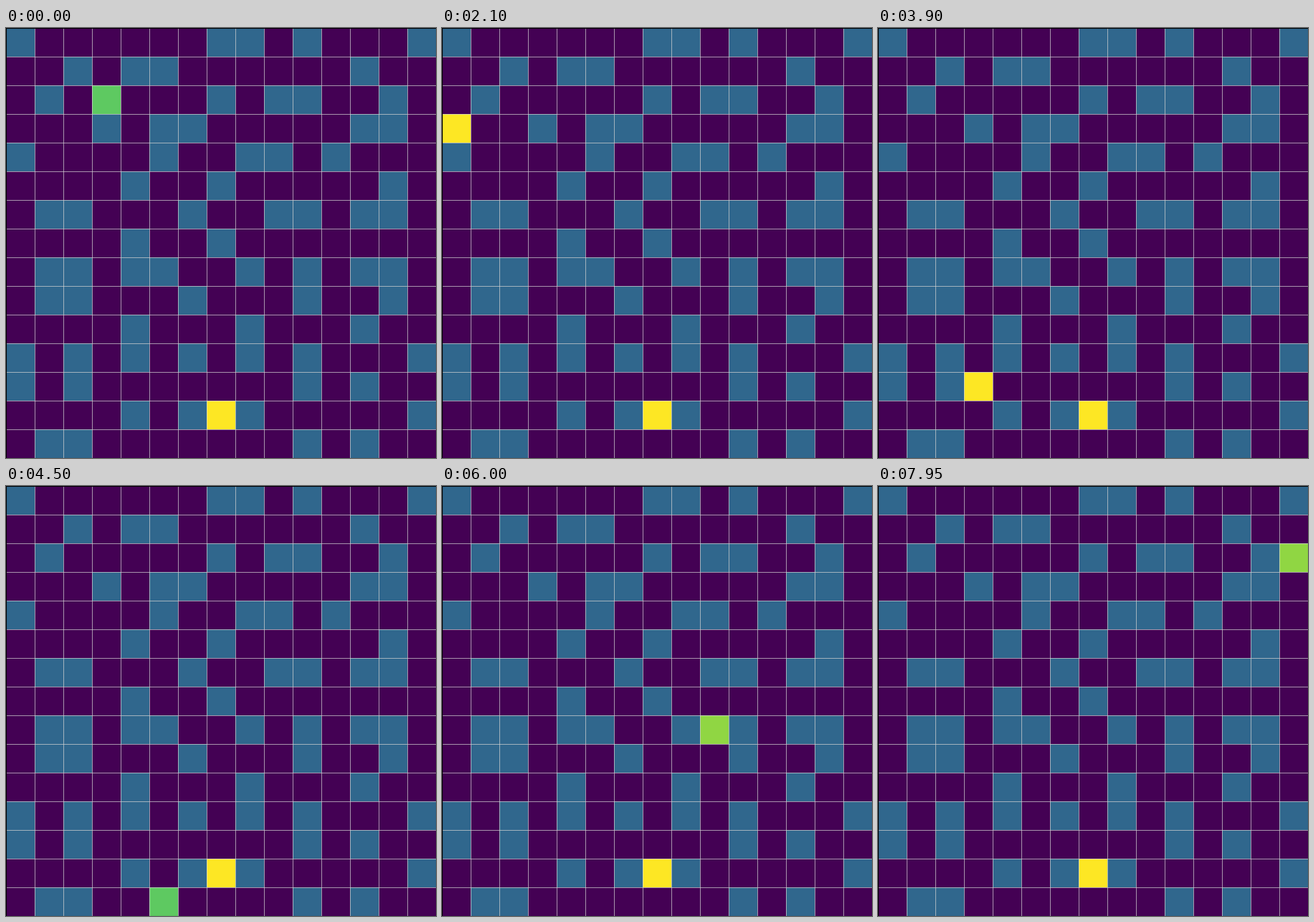
Recreate the animation shown at these times as a matplotlib script. Size 600 px wide and 600 px high, loop 8 s.

```python
import matplotlib.pyplot as plt
import numpy as np
from matplotlib.animation import FuncAnimation

SIZE = 15
INTERVAL = 50
FRAMES = 160
FRAMES_PER_MOVE = 3

MAZE = """
#......##.#...#
..#.##......#..
.#.....#.##..#.
...#.##.....##.
#....#..##.#...
....#..#.....#.
.##...#..##.##.
....#..#.......
.##.##..#.#.##.
.##...#...#..#.
....#...#...#..
#.#.#.#.#.#...#
#.#.......#.#..
....#.#G#.....#
.##.......#.#..
""".split()

# Cell values on a 0-12 scale; the walker's value shows its heading.
CELLS = {".": 0, "#": 4, "G": 12}
HEADINGS = {"R": (1, 0, 9), "U": (0, -1, 10), "L": (-1, 0, 11), "D": (0, 1, 12)}
ROUTE = "R3 U2 L5 D1 L1 D2 R2 D2 R1 D9 R6 U7 L1 U2 R4 U1 R2 U2"


def walk(col, row, route):
    """List (col, row, heading value) after every single-cell move."""
    poses = [(col, row, HEADINGS[route[0]][2])]
    for leg in route.split():
        dx, dy, value = HEADINGS[leg[0]]
        for _ in range(int(leg[1:])):
            col, row = col + dx, row + dy
            poses.append((col, row, value))
    return poses


maze = np.array([[CELLS[c] for c in line] for line in MAZE])
poses = walk(3, 2, ROUTE)

fig = plt.figure(figsize=(6, 6), dpi=100)
ax = fig.add_axes([0, 0, 1, 1])
image = ax.imshow(maze, cmap="viridis", vmin=0, vmax=12,
                  extent=(0, SIZE, SIZE, 0), interpolation="nearest")
ax.set_xticks(range(1, SIZE))
ax.set_yticks(range(1, SIZE))
ax.tick_params(length=0, labelbottom=False, labelleft=False)
ax.grid(color="lightgray", linewidth=0.5)


def update(frame):
    col, row, value = poses[min(frame // FRAMES_PER_MOVE, len(poses) - 1)]
    cells = maze.copy()
    cells[row, col] = value
    image.set_data(cells)
    return [image]


anim = FuncAnimation(fig, update, frames=FRAMES, interval=INTERVAL,
                     repeat=True, repeat_delay=0)
plt.show()
```
